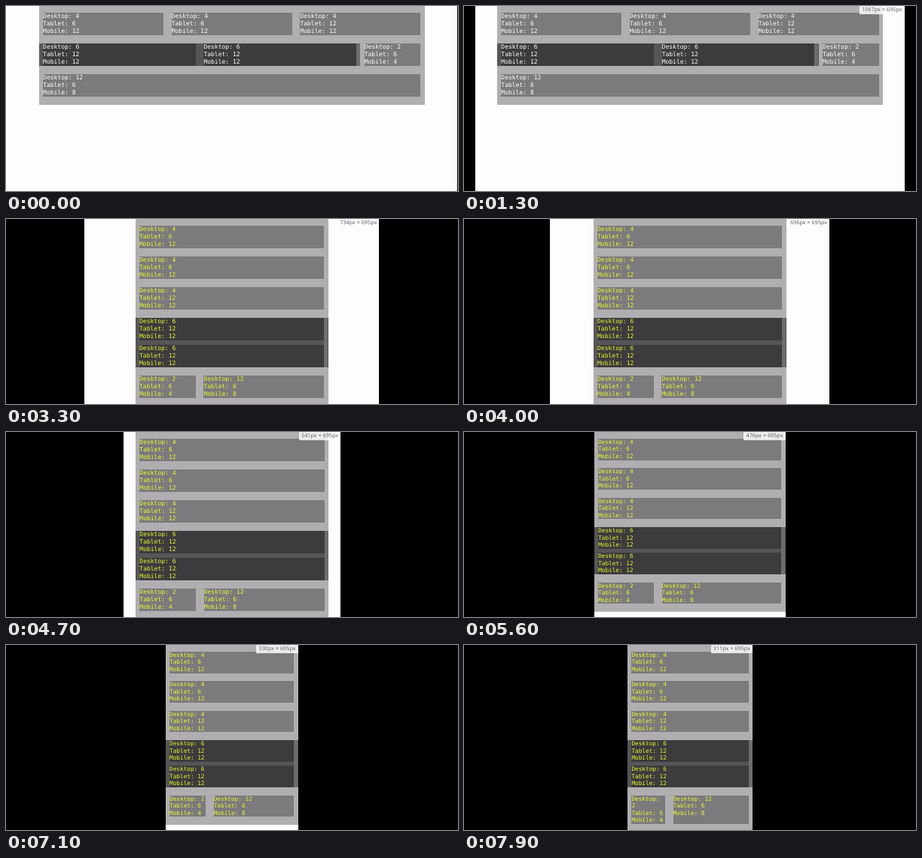
Write an HTML page that moves like this. It is 600 px wide and 247 px high and loops after 8 s.

```html
<!DOCTYPE html>
<html lang="en">
<head>
<meta charset="utf-8">
<title>Responsive grid</title>
<style>
  html, body { margin: 0; width: 600px; height: 247px; overflow: hidden; background: #000; }
  /* zoom, unlike a transform, snaps box edges to whole pixels */
  #stage { position: relative; width: 1125px; height: 464px; zoom: .53333; text-rendering: geometricPrecision; }
  #view { position: absolute; top: 0; height: 100%; overflow: hidden; background: #fefcfe; }
  .grid { display: grid; grid-template-columns: repeat(12, minmax(0, 1fr)); }
  #page { box-sizing: border-box; margin: 0 auto; padding: 16.5px 0 20px; row-gap: 20px; background: #b0aeb0;
    font-family: "DejaVu Sans Mono", monospace; }
  .cell { margin: 0 10px; background: #7c7a7c; }
  .nested { row-gap: 10px; background: linear-gradient(#6e6c6e, #6e6c6e) right / 10px 100% no-repeat #575557; }
  .nested .cell { background: #3d3b3d; }
  #size { position: absolute; top: 0; right: 0; padding: 0 6px; background: rgba(255, 255, 255, .8); color: #555;
    font: 13.6px/21px "Open Sans", sans-serif; white-space: nowrap; }
</style>
</head>
<body>
<div id="stage"><div id="view"><div id="page" class="grid"></div><div id="size"></div></div></div>
<script>
const $ = id => document.getElementById(id);
const view = $('view'), page = $('page'), size = $('size');
const TOTAL = 1125, LOOP = 8000, STEP = 100;

// Column spans of the outer items, and of the two nested cells
const modes = [
  { min: 960, width: 960, spans: [4, 4, 4, 10, 2, 12], inner: 6, color: '#fff' },
  { min: 760, width: 760, spans: [6, 6, 12, 12, 6, 6], inner: 6, color: '#52fa55' },
  { min: 0, width: 480, spans: [12, 12, 12, 12, 4, 8], inner: 12, color: '#e8fa30' },
];

// Viewport drags: start, end, width from, width to, ease-out power
const drags = [
  [400, 1300, 1118, 1067, 2],
  [1300, 1600, 1067, 1024, 1],
  [1900, 2100, 1024, 963, 1],
  [2600, 4300, 814, 692, 2],
  [4700, 5500, 541, 476, 2],
  [5800, 7900, 441, 311, 2],
];

function add(parent, className) {
  const el = document.createElement('div');
  el.className = className;
  return parent.appendChild(el);
}

function addCell(parent, desktop, tablet, mobile) {
  add(parent, 'cell').innerHTML =
    `<div>Desktop: ${desktop}</div><div>Tablet: ${tablet}</div><div>Mobile: ${mobile}</div>`;
}

addCell(page, 4, 6, 12);
addCell(page, 4, 6, 12);
addCell(page, 4, 12, 12);
const nested = add(page, 'nested grid');
addCell(nested, 6, 12, 12);
addCell(nested, 6, 12, 12);
addCell(page, 2, 6, 4);
addCell(page, 12, 6, 8);

function widthAt(t) {
  let width = TOTAL - 1;
  for (const [start, end, from, to, power] of drags) {
    if (t < start) break;
    const k = Math.min(1, (t - start) / (end - start));
    width = to + (from - to) * (1 - k) ** power;
  }
  return Math.round(width);
}

function draw(now) {
  const t = Math.floor(now % LOOP / STEP) * STEP;
  const width = widthAt(t);
  const mode = modes.find(m => width >= m.min);
  const small = width < 480;

  view.style.left = Math.floor((TOTAL - width) / 2) + 'px';
  view.style.width = width + 'px';
  page.style.width = Math.min(mode.width, width) + 'px';
  page.style.color = mode.color;
  page.style.fontSize = small ? '14.5px' : '15.05px';
  page.style.lineHeight = small ? '18px' : '19px';
  mode.spans.forEach((n, i) => page.children[i].style.gridColumn = 'span ' + n);
  for (const cell of nested.children) cell.style.gridColumn = 'span ' + mode.inner;

  size.hidden = t < drags[0][0];
  size.textContent = `${width}px × 695px`;
}

const begin = performance.now();
function tick() {
  draw(performance.now() - begin);
  requestAnimationFrame(tick);
}
tick();
</script>
</body>
</html>
```
